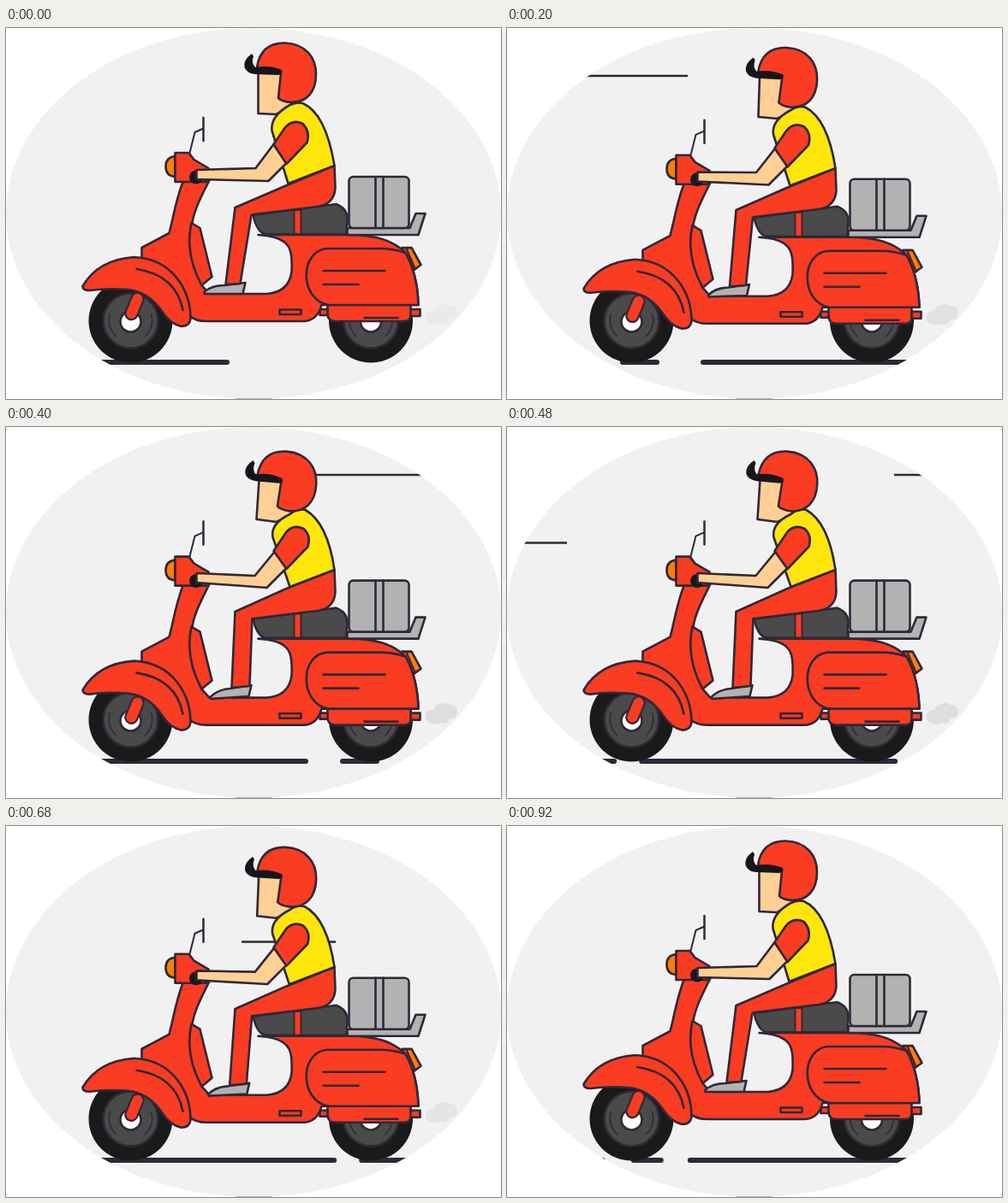
Animation of 578x434 px, one loop 0.96 s. Source, as an HTML page:

```html
<!DOCTYPE html>
<html lang="en">
<head>
<meta charset="utf-8">
<title>Scooter ride</title>
<style>
html, body { margin: 0; width: 100%; height: 100%; overflow: hidden; background: #fff; }
svg { display: block; width: 578px; height: 434px; }
.o { stroke: #2f2838; stroke-width: 2.6; stroke-linejoin: round; stroke-linecap: round; fill: none; }
.red { fill: #f93c22; }
.grey { fill: #b2b2b2; }
.dark { fill: #4a4a4a; }
.skin { fill: #ffcf94; }
.yellow { fill: #ffe60a; }
.orange { fill: #ff7d05; }
</style>
</head>
<body>
<svg viewBox="0 0 578 434">
  <defs>
    <clipPath id="oval"><ellipse cx="289" cy="217" rx="289" ry="217"/></clipPath>
    <g id="wheel">
      <circle r="49" fill="#1a1a1a"/>
      <circle r="32" class="o dark"/>
      <path d="M-24 -8A25 25 0 0 0 -17 18M24 -8A25 25 0 0 1 17 18" class="o" style="stroke-width:1.5"/>
      <circle r="12" cy="1" class="o" style="fill:#fff"/>
    </g>
  </defs>
  <ellipse cx="289" cy="217" rx="289" ry="217" fill="#f1f1f1"/>
  <path d="M268 433.500H310" stroke="#b5b5b5"/>
  <g clip-path="url(#oval)">
    <path id="high" class="o" d="M0 56H200" style="stroke-linecap:butt"/>
    <path id="low" class="o" d="M0 135.500H110" style="stroke-linecap:butt"/>
    <g id="ground" class="o" style="stroke-width:6"></g>
    <path id="smoke" fill="#dedede" d="M497 347Q489 345 490 337Q491 330 499 331Q501 323 508 324Q513 321 517 325Q527 324 527 333Q527 341 518 341Q516 349 507 346Q502 349 497 347Z"/>
  </g>

  <use href="#wheel" x="145.500" y="342.500"/>
  <use href="#wheel" x="426" y="342.500"/>

  <g id="bike">
    <path class="o red" d="M472 329H484V337H472ZM367 329H378V336H367Z"/>
    <path class="o red" d="M463 257H474L485 277L473 286Z"/>
    <path class="orange" d="M470 259H473.500L483 277L478 280Z"/>
    <path class="o" d="M468 258L478 281" style="stroke-width:2"/>
    <path class="o red" d="M207 180C198 204 196 222 191 240L159 257V272L200 300L214 336Q221 343 235 343H347Q364 343 369 324H482Q481 288 467 263C452 248 432 242 400 242H295L305 243C335 247 335 263 334 285Q331 309 305 311H238L229 301L217 260V236C218 217 227 200 238 178Z"/>
    <path class="o red" d="M217 228L227 234L241 291L229 301Q209 264 217 228Z"/>
    <path class="o red" d="M376 324H473V336Q473 343 466 343H385Q376 343 376 334Z"/>
    <path class="o red" d="M467 263Q452 258 438 258H375C343 261 343 318 377 324H482Q481 288 467 263Z"/>
    <path class="o" d="M371 284H443M371 300H412M419 339H458M320 329.500H345V335H320Z"/>
    <path class="o" d="M154 317L147 334" style="stroke-width:16.5"/>
    <path d="M154 317L147 334" fill="none" stroke="#f93c22" stroke-width="12" stroke-linecap="round"/>
    <path class="o red" d="M90 302Q108 271 150 268C195 270 216 307 216 340Q215 349 205 349Q192 346 183 332Q167 308 142 306Q118 304 98 307Q90 307 90 302Z"/>
    <path class="o" d="M153 282Q199 289 207 330"/>
    <path class="o grey" d="M399 234H472L479 217H490L482 242H399Z"/>
    <rect class="o grey" x="401" y="174" width="70" height="60" rx="5"/>
    <path class="o" d="M432 174V234M441 174V234"/>
    <path class="o dark" d="M289 219L386 206Q399 211 399 223L398 241H305Q294 241 289 219Z"/>
    <path class="o red" d="M337 213H345V241H337Z" style="stroke-width:2"/>
    <path class="o" d="M215 146L221 122L230 118" style="stroke-width:2"/>
    <path class="o" d="M231 105V132" style="stroke-width:2.500"/>
    <path class="o orange" d="M198 150Q187 151 187 162Q187 173 198 174Z"/>
    <path class="o red" d="M198 146H214L220 154L237 164L234 180H198Z"/>
    <circle cx="222.500" cy="174.500" r="8" fill="#1a1620"/>
  </g>

  <g id="rider"></g>

  <g id="head">
    <path class="o red" d="M293 46C296 26 308 17.500 325 17.500C351 18 362 36 362 54C362 76 350 87 333 87Q322 86 318 82L321 53L295 50Z"/>
    <path d="M287 30Q277 37 278.500 46Q281 53 291 54L318 55Q324 54 322 49Q307 43 291 46Q286 41 289 33Z" fill="#17141c"/>
  </g>
</svg>
<script>
const LOOP = 960, STEP = 40, SVG = 'http://www.w3.org/2000/svg';
const $ = id => document.getElementById(id);

function addPath(parent, cls, d) {
  const el = document.createElementNS(SVG, 'path');
  if (cls) el.setAttribute('class', cls);
  if (d) el.setAttribute('d', d);
  parent.appendChild(el);
  return el;
}

// Road dashes: [left, right] at time zero
const road = [[-32, 261], [-126, -80], [-465, -163], [-976, -491], [-1042, -1004], [-1400, -1072]];
for (const [a, b] of road) addPath($('ground'), '', `M${a + 3} 391H${b - 3}`);

// Rider parts: class, raised pose, lowered pose
const parts = [
  ['o grey',
    'M232 309Q240 301 256 301L280 298L277 311L232 311Z',
    'M239 316Q248 307 262 306L287 302L284 315L240 318Z'],
  ['o red',
    'M384 161L385 187Q384 206 364 209L290 218L287 219L274 299L257 300L268 210L326 185Z',
    'M384 167L385 193Q384 212 364 215L290 224L288 224L285 303L264 305L268 216L328 189Z'],
  ['o skin',
    'M295 50L295 100L316 101L334 91L340 50Z',
    'M296 62L293 108L316 111L334 103L340 62Z'],
  ['o yellow',
    'M332 90Q340 86 347 88Q374 100 384 161L330 182L311 120Q309 103 332 90Z',
    'M332 102Q340 95 350 97Q376 112 384 167L332 187L312 129Q309 113 332 102Z'],
  ['o skin',
    'M223 166L292 164L313 136L328 158L307 179L223 177Z',
    'M223 171L291 174L314 146L328 165L305 188L223 182Z'],
  ['o red',
    'M313 136L326 117Q335 106 347 112Q356 121 352 134L328 159Z',
    'M313 145L327 124Q335 113 348 119Q357 127 353 140L328 166Z']
].map(([cls, up, down]) => ({ el: addPath($('rider'), cls), up, down: down.match(/[\d.]+/g) }));

const blend = (up, down, p) => {
  let i = 0;
  return up.replace(/[\d.]+/g, n => (+n + (down[i++] - n) * p).toFixed(2));
};

// Linear interpolation through [time, value] keys
function track(keys, t) {
  const i = keys.findIndex(k => k[0] > t);
  if (i < 0) return keys[keys.length - 1][1];
  const [t0, a] = keys[i - 1], [t1, b] = keys[i];
  return a + (b - a) * (t - t0) / (t1 - t0);
}

const bounce = [[0, 0], [400, 1], [560, 1], [920, 0]];
const puff = [[0, .4], [200, .8], [400, 1], [560, .9], [680, .6], [800, .2], [900, 0]];

const shift = (id, x, y = 0, more = '') => $(id).setAttribute('transform', `translate(${x} ${y}) ${more}`);

function draw(t) {
  const p = track(bounce, t);
  shift('bike', -.5, 5.6 * p);
  shift('rider', -.5);
  shift('head', 0, 11.3 * p, `rotate(${3 * p} 330 60)`);
  for (const { el, up, down } of parts) el.setAttribute('d', blend(up, down, p));
  shift('ground', 1.29 * t);
  shift('high', 1.575 * t - 304);
  shift('low', 1.575 * t - 796);
  $('smoke').setAttribute('opacity', track(puff, t));
}

const start = performance.now();
function tick() {
  const t = (performance.now() - start) % LOOP;
  draw(Math.floor(t / STEP) * STEP);
  requestAnimationFrame(tick);
}
draw(0);
requestAnimationFrame(tick);
</script>
</body>
</html>
```
